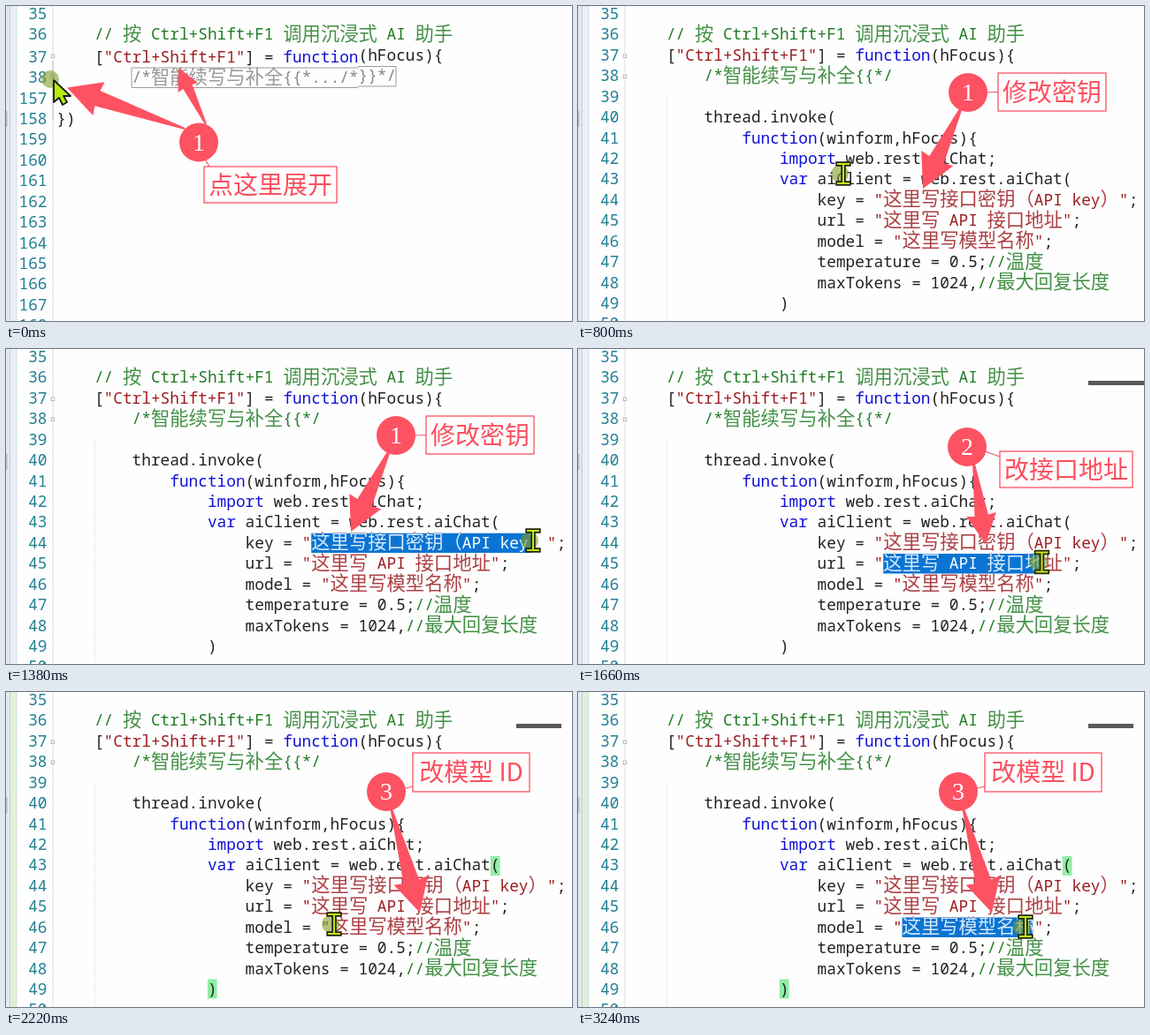
These frames come from a looping animation (640x357 px, 3.66 s). An HTML page:

```html
<!DOCTYPE html>
<html lang="zh">
<head>
<meta charset="utf-8">
<style>
html, body { margin: 0; width: 100%; height: 100%; overflow: hidden; background: #fefefe; }
svg { display: block; width: 100%; height: 100%; }
text { white-space: pre; text-spacing-trim: space-all; }
.mono { font: 17.77px "Noto Sans Mono", "DejaVu Sans Mono", monospace; }
.cjk { font: 300 21.33px "Noto Sans CJK SC", "Noto Sans CJK", sans-serif; fill-opacity: 0.84; }
.label { font-family: "Noto Sans CJK SC", "Noto Sans CJK", sans-serif; font-weight: 300; fill: #fb4f5f; text-anchor: middle; }
.num { font: 28px "Liberation Serif", serif; fill: #fff; text-anchor: middle; }
</style>
</head>
<body>
<svg id="stage" viewBox="0 0 640 357" preserveAspectRatio="none"></svg>
<script>
const NS = 'http://www.w3.org/2000/svg';
const LOOP = 3660, LEFT = 57.3, CW = 10.664, LH = 23.43;
const PINK = '#fd5262', INK = '#222', RED = '#9c1c20', BLUE = '#1010d8', GREEN = '#207c24', TEAL = '#217f94', GRAY = '#858585';
const stage = document.getElementById('stage');

function el(parent, tag, attrs = {}, text) {
  const node = document.createElementNS(NS, tag);
  for (const k in attrs) node.setAttribute(k, attrs[k]);
  if (text !== undefined) node.textContent = text;
  return parent.appendChild(node);
}
const group = (parent = stage) => el(parent, 'g');
const rect = (g, x, y, width, height, fill, more) => el(g, 'rect', { x, y, width, height, fill, ...more });
const show = (node, on) => node.setAttribute('visibility', on ? 'visible' : 'hidden');
const baseline = row => 15 + LH * row;

// Monospaced grid: wide characters take two columns.
function code(g, row, col, tokens, dy = 0) {
  for (const [fill, str] of tokens) {
    for (const run of str.match(/[\u3000-\u9fff\uff00-\uffef]+|[\x20-\x7e]+/g)) {
      const wide = run.charCodeAt(0) > 255;
      el(g, 'text', { x: LEFT + col * CW, y: baseline(row) + dy + (wide ? 0.6 : 0), fill, class: wide ? 'cjk' : 'mono' }, run);
      col += run.length * (wide ? 2 : 1);
    }
  }
}

function lineNo(g, row, n, dy = 0) {
  el(g, 'text', { x: 46.5, y: baseline(row) + dy, fill: TEAL, class: 'mono', 'text-anchor': 'end' }, n);
}

function arrow(g, tx, ty, ex, ey, len = 38, half = 20) {
  const d = Math.hypot(ex - tx, ey - ty), ux = (ex - tx) / d, uy = (ey - ty) / d;
  const at = (along, side) => [tx + ux * along - uy * side, ty + uy * along + ux * side].map(v => v.toFixed(1)).join();
  const s = half * 0.46, n = len * 0.96;
  el(g, 'polygon', {
    fill: PINK,
    points: [at(0, 0), at(len, half), at(n, s), at(d, 1), at(d, -1), at(n, -s), at(len, -half)].join(' ')
  });
}

function badge(g, x, y, n) {
  el(g, 'circle', { cx: x, cy: y, r: 22, fill: PINK });
  el(g, 'text', { x, y: y + 9, class: 'num' }, n);
}

function label(g, x, y, w, h, str, link) {
  el(g, 'path', { d: link, stroke: PINK, 'stroke-width': 1.2 });
  rect(g, x, y, w, h, '#fffdfd', { stroke: PINK, 'stroke-width': 1.3 });
  el(g, 'text', { x: x + w / 2, y: y + h / 2 + 10.4, class: 'label', 'font-size': 28 }, str);
}

// Margin
rect(stage, 0, 0, 640, 357, '#fefefe');
rect(stage, 0, 0, 4.5, 357, '#e3e9f2');
const strip = rect(stage, 5, 0, 7, 357, '#eaf0f6');
rect(stage, 4.2, 0, 0.8, 357, '#b9c3cf');
rect(stage, 11.6, 0, 0.8, 357, '#cfd8df');
rect(stage, 0, 119, 1.5, 18, '#b4bbc4');
rect(stage, 52.6, 0, 0.8, 357, '#d6d6d6');

// Shared heading
lineNo(stage, 0, 35);
lineNo(stage, 1, 36);
code(stage, 1, 4, [[GREEN, '// 按 Ctrl+Shift+F1 调用沉浸式 AI 助手']]);
for (const y of [55, 78]) rect(stage, 51.2, y, 3.6, 3.6, '#fff', { stroke: '#a9a9a9', 'stroke-width': 0.8 });

const hotkey = [[INK, '['], [RED, '"Ctrl+Shift+F1"'], [INK, '] = '], [BLUE, 'function']];

// Folded view
const folded = group(), DROP = 1.8;
[37, 38].forEach((n, i) => lineNo(folded, i + 2, n, DROP));
for (let n = 157; n < 169; n++) lineNo(folded, n - 153, n, DROP);
rect(folded, 52.6, 62, 0.8, 67, '#b5b5b5');
code(folded, 2, 4, hotkey, DROP);
code(folded, 2, 32, [[INK, '(hFocus){']]);
el(folded, 'path', { d: 'M398 70H142V92.5H398M398 68.5H441V91H398', fill: 'none', stroke: '#9a9a9a' });
code(folded, 3, 8, [[GRAY, '/*智能续写与补全{{*.../*']], DROP);
code(folded, 3, 32, [[GRAY, '}}*/']]);
code(folded, 5, 0, [[INK, '})']], DROP);

// Unfolded view
const open = group();
el(open, 'path', { d: 'M100.5 103V357', stroke: '#d4d4d4', 'stroke-width': 0.8, 'stroke-dasharray': '1 1' });
const match = group(open);
rect(match, LEFT + 46 * CW, 186, CW, 22, '#90eea4');
rect(match, LEFT + 16 * CW, 325.5, CW, 22, '#90eea4');
for (let n = 37; n < 51; n++) lineNo(open, n - 35, n);
const values = [[9, 27, '这里写接口密钥（API key）'], [10, 27, '这里写 API 接口地址'], [11, 29, '这里写模型名称']];
const setting = (name, i) => [[INK, name + ' = '], [RED, '"' + values[i][2] + '"'], [INK, ';']];
[
  [2, 4, [...hotkey, [INK, '(hFocus){']]],
  [3, 8, [[GREEN, '/*智能续写与补全{{*/']]],
  [5, 8, [[INK, 'thread.invoke(']]],
  [6, 12, [[BLUE, 'function'], [INK, '(winform,hFocus){']]],
  [7, 16, [[BLUE, 'import'], [INK, ' web.rest.aiChat;']]],
  [8, 16, [[BLUE, 'var'], [INK, ' aiClient = web.rest.aiChat(']]],
  [9, 20, setting('key', 0)],
  [10, 20, setting('url', 1)],
  [11, 20, setting('model', 2)],
  [12, 20, [[INK, 'temperature = 0.5;'], [GREEN, '//温度']]],
  [13, 20, [[INK, 'maxTokens = 1024,'], [GREEN, '//最大回复长度']]],
  [14, 16, [[INK, ')']]]
].forEach(line => code(open, ...line));

// Selected text, revealed by a clip
const clip = rect(el(stage, 'clipPath', { id: 'sel' }), 0, 0, 0, 22.4);
const selected = el(stage, 'g', { 'clip-path': 'url(#sel)' });
rect(selected, 0, 0, 640, 357, '#0b74d3');
for (const [row, col, str] of values) code(selected, row, col, [['#fff', str]]);

const bar = rect(stage, 577, 36, 51, 5, '#595959');

// Callouts
const unfold = group(), unfoldNote = group(unfold);
arrow(unfoldNote, 195, 70, 226, 134, 25, 12.5);
label(unfoldNote, 224, 182, 150, 41, '点这里展开', 'M224 172L230 182');
arrow(unfold, 69, 92.5, 202, 139);
badge(unfold, 218, 154.5, 1);

function callout(n, x, y, points, ...box) {
  const g = group();
  arrow(g, ...points);
  label(g, ...box);
  badge(g, x, y, n);
  return g;
}
const steps = [
  [800, 1520, callout(1, 441, 98, [390, 207, 435, 112], 475, 76, 122, 43, '修改密钥', 'M460 98L475 97.5')],
  [1520, 2080, callout(2, 440, 111, [461, 221, 447, 127, 34, 17], 477, 116, 150, 41, '改接口地址', 'M460 116L477 122')],
  [2080, LOOP, callout(3, 430, 113, [468, 250, 435, 130], 460, 69, 132, 44, '改模型 ID', 'M448 110L460 107')]
];

// Pointers
const halo = el(stage, 'circle', { r: 10, fill: '#7f9c25', 'fill-opacity': 0.6 });
const caret = rect(stage, 56.6, 67, 1, 15, '#777');
const pointer = el(stage, 'path', {
  d: 'M0 0V25L6 20L10 28L15 25L11 18H19Z', fill: '#b6ee0c', stroke: '#1a1a1a', 'stroke-width': 1.8, 'stroke-linejoin': 'round'
});
const beam = group();
for (const [stroke, w] of [['#22260c', 5.4], ['#c3e619', 2]])
  el(beam, 'path', { d: 'M-6-11H6M0-11V11M-6 11H6', stroke, 'stroke-width': w, 'stroke-linecap': 'square' });

const ticks = [0, 500, 800, 940, 1080, 1220, 1380, 1520, 1660, 1800, 1940, 2080, 2220, 2360, 2520, 2660, 2800, 2940, 3100, 3240];
const path = [
  [0, 54, 84], [500, 54, 81], [800, 300, 190], [940, 353, 217], [1380, 596, 217], [1520, 353, 234],
  [1660, 524.5, 241.5], [1800, 552, 242], [2080, 420, 258], [2220, 371, 263], [2360, 371, 263], [3240, 506, 266]
];
// start, end, value index
const drags = [[1080, 1520, 0], [1660, 1940, 1], [2520, LOOP, 2]];

function locate(t) {
  let i = path.length - 1;
  while (path[i][0] > t) i--;
  const a = path[i], b = path[i + 1] || a;
  const k = b === a ? 0 : (t - a[0]) / (b[0] - a[0]);
  return [a[1] + (b[1] - a[1]) * k, a[2] + (b[2] - a[2]) * k];
}

function draw(ms) {
  const t = ticks.filter(v => v <= ms).pop();
  const [x, y] = locate(t);
  const at = `translate(${x} ${y})`;

  show(folded, t < 500);
  show(open, t >= 500);
  show(match, t >= 2080);
  show(unfold, t < 800);
  show(unfoldNote, t < 500);
  for (const [from, to, g] of steps) show(g, t >= from && t < to);

  const drag = drags.find(([from, to]) => t >= from && t < to);
  show(selected, drag);
  if (drag) {
    const [row, col, str] = values[drag[2]];
    const left = LEFT + col * CW;
    const cols = [...str].reduce((n, c) => n + (c > '\xff' ? 2 : 1), 0);
    clip.setAttribute('x', left);
    clip.setAttribute('y', baseline(row) - 17.2);
    clip.setAttribute('width', Math.max(0, Math.min(x + (drag[2] === 2 ? 8 : -2) - left, cols * CW)));
  }

  show(bar, t >= 1520);
  bar.setAttribute('width', t < 2220 ? 63 : 51);
  strip.setAttribute('fill', t < 2080 ? '#eaf0f6' : '#e0f1d6');

  const early = t < 800;
  show(pointer, early);
  show(beam, !early);
  show(caret, t === 500);
  pointer.setAttribute('transform', at);
  beam.setAttribute('transform', at);
  halo.setAttribute('cx', x - 4);
  halo.setAttribute('cy', y - (early ? 1 : 0));
}

const begin = performance.now();
function tick() {
  draw((performance.now() - begin) % LOOP);
  requestAnimationFrame(tick);
}
tick();
</script>
</body>
</html>
```
